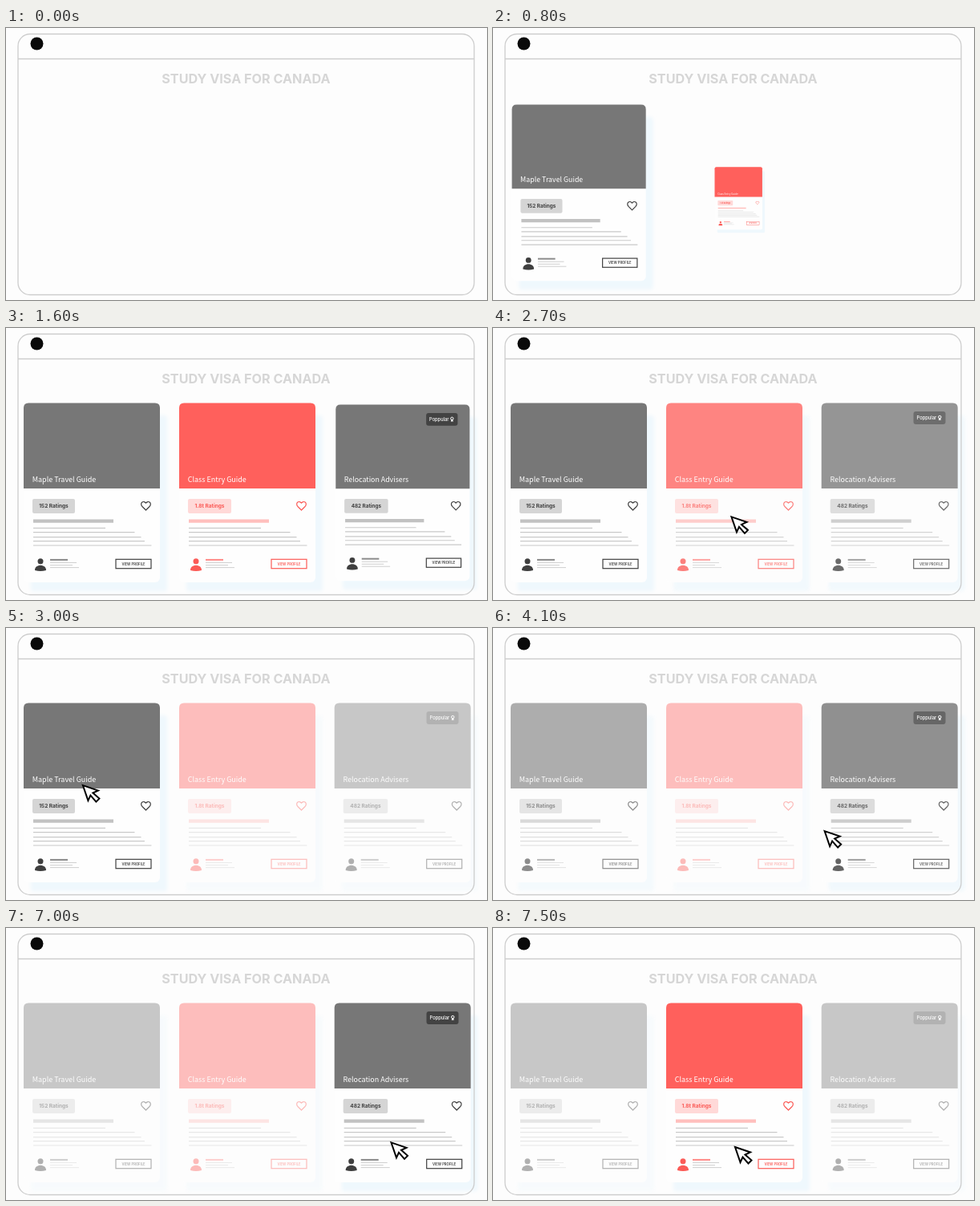
Animation, 600 px wide and 339 px high, one loop 8000 ms. Source, as an HTML page:

```html
<!DOCTYPE html>
<html lang="en">
<head>
<meta charset="utf-8">
<style>
  html, body { margin: 0; width: 100%; height: 100%; overflow: hidden; background: #fdfdfd; }
  svg { display: block; width: 100%; height: 100%; }
  text { font-family: Inter, "Open Sans", sans-serif; }
  .name { font: 500 9px "Noto Sans CJK JP", "Noto Sans CJK SC", "Noto Sans", sans-serif; fill: #fff; }
</style>
</head>
<body>
<svg viewBox="0 0 600 339">
  <defs><filter id="soft"><feGaussianBlur stdDeviation="2"/></filter></defs>
  <text x="299.5" y="69" font-size="16.2" font-weight="700" text-anchor="middle" fill="#d6d6d6">STUDY VISA FOR CANADA</text>
  <g id="cards"></g>
  <g fill="none" stroke="#cdcdcd" stroke-width="1.3">
    <rect x="15" y="7.5" width="569" height="325" rx="15"/>
    <path d="M15 38.5H584"/>
  </g>
  <circle cx="38.5" cy="19.5" r="8" fill="#0a0a0a"/>
  <path id="cursor" d="M1 1L20 7.5L13.5 10.5L21.5 17.5L17.5 21.5L10.5 13.5L7.5 20Z" fill="#fff" stroke="#000" stroke-width="2"/>
</svg>
<script>
const LOOP = 8000, STEP = 100;
const grey = { top: '#777', ink: '#3f3f3f', pill: '#d5d5d5', bar: '#c2c2c2', tag: '#8a8a8a' };
const red = { top: '#ff605c', ink: '#fb5a56', pill: '#ffd9d8', bar: '#ffbfbd', tag: '#ff8a87' };
const data = [
  { x: 22, name: 'Maple Travel Guide', rating: '152 Ratings', pillW: 53, c: grey },
  { x: 216, name: 'Class Entry Guide', rating: '1.8t Ratings', pillW: 54, c: red },
  { x: 409.7, name: 'Relocation Advisers', rating: '482 Ratings', pillW: 55.5, c: grey, badge: true }
];

const line = (x, y, end, color, w) => `<path d="M${x} ${y}H${end}" stroke="${color}" stroke-width="${w}"/>`;

const badge = `
  <rect x="114.8" y="11" width="40" height="16" rx="3" fill="#434343"/>
  <text x="118.8" y="21.4" font-size="5.8" font-weight="500" fill="#fff">Poppular</text>
  <circle cx="147.6" cy="18" r="1.7" fill="none" stroke="#fff"/>
  <path d="M146.4 19.5V22.3L147.6 21.5L148.8 22.3V19.5Z" fill="#fff"/>`;

// Card contents, measured from the card's top left corner
function cardMarkup({ name, rating, pillW, c, badge: popular }) {
  const lines = [[156.3, 102], [161.6, 138.5], [167.6, 146.5], [172.6, 151], [178, 159.5]];
  const bio = [[199.5, 66], [202.6, 61], [205.6, 69]];
  return `
    <rect x="9" y="16" width="170" height="219" rx="4" fill="#eff8fd" filter="url(#soft)"/>
    <rect y=".4" width="170" height="223.6" rx="6" fill="#fefefe"/>
    <path d="M0 107V6.4Q0 .4 6 .4H164Q170 .4 170 6.4V107Z" fill="${c.top}"/>
    <text class="name" x="10.7" y="99">${name}</text>
    ${popular ? badge : ''}
    <rect x="11" y="120" width="${pillW}" height="18" rx="2" fill="${c.pill}"/>
    <text x="${11 + pillW / 2}" y="131.3" font-size="6.5" font-weight="700" text-anchor="middle" fill="${c.ink}">${rating}</text>
    <path d="M152.5 134L148.2 129.8C144 125.5 149.5 121 152.5 125.2C155.5 121 161 125.5 156.8 129.8Z"
      fill="none" stroke="${c.ink}" stroke-width="1.2" stroke-linejoin="round"/>
    ${line(12, 147.6, 112, c.bar, 4.4)}
    ${lines.map(([y, end]) => line(12, y, end, '#c9c9c9', 1.2)).join('')}
    <circle cx="21" cy="197.7" r="3.5" fill="${c.ink}"/>
    <path d="M14 209C13.5 200.5 28.5 200.5 28 209Q21 210.8 14 209Z" fill="${c.ink}"/>
    ${line(33, 195.9, 55, c.tag, 2)}
    ${bio.map(([y, end]) => line(33, y, end, '#cfcfcf', 1)).join('')}
    <rect x="115" y="195.3" width="44" height="11.4" fill="none" stroke="${c.ink}" stroke-width="1.2"/>
    <text x="137" y="202.5" font-size="4.2" font-weight="600" text-anchor="middle" fill="${c.ink}">VIEW PROFILE</text>`;
}

const cursor = document.getElementById('cursor');
const cardBox = document.getElementById('cards');
cardBox.innerHTML = data.map(d => `<g>${cardMarkup(d)}</g>`).join('');
const cards = [...cardBox.children];

const progress = (t, from, to) => Math.min(1, Math.max(0, (t - from) / (to - from)));
const cubic = p => p < .5 ? 4 * p ** 3 : 1 - 4 * (1 - p) ** 3;
const quad = p => p < .5 ? 2 * p * p : 1 - 2 * (1 - p) ** 2;

// cubic-bezier(.675, 0, .23, 1)
function pop(p) {
  let lo = 0, hi = 1;
  for (let i = 0; i < 24; i++) {
    const u = (lo + hi) / 2, v = 1 - u;
    if (3 * u * v * v * .675 + 3 * u * u * v * .23 + u ** 3 < p) lo = u; else hi = u;
  }
  return p >= 1 ? 1 : lo * lo * (3 - 2 * lo);
}

const moves = [
  { from: 2215, to: 3215, x: 79, y: 192, ease: cubic },
  { from: 3215, to: 4600, x: 490, y: 266, ease: cubic },
  { from: 6900, to: 7500, x: 301, y: 272, ease: quad }
];

function draw(t) {
  const first = quad(progress(t, 2450, 3020));
  const third = quad(progress(t, 3800, 4300));
  const second = quad(progress(t, 7030, 7450));
  const dim = [third, first - second, first - third + second];
  cards.forEach((g, i) => {
    const s = pop(progress(t, i * 400, i * 400 + 950));
    const x = data[i].x + 93 * (1 - s), y = 93 + 123 * (1 - s);
    g.setAttribute('transform', `translate(${x} ${y}) scale(${s})`);
    g.setAttribute('display', s > .001 ? 'inline' : 'none');
    g.setAttribute('opacity', 1 - .6 * dim[i]);
  });

  let x = 479, y = 270;
  for (const m of moves) {
    const k = m.ease(progress(t, m.from, m.to));
    x += (m.x - x) * k;
    y += (m.y - y) * k;
  }
  cursor.setAttribute('transform', `translate(${x} ${y})`);
  cursor.setAttribute('opacity', progress(t, 2000, 2250));
}

function tick() {
  const t = performance.now() % LOOP;
  draw(Math.floor(t / STEP) * STEP);
  requestAnimationFrame(tick);
}
tick();
</script>
</body>
</html>
```
